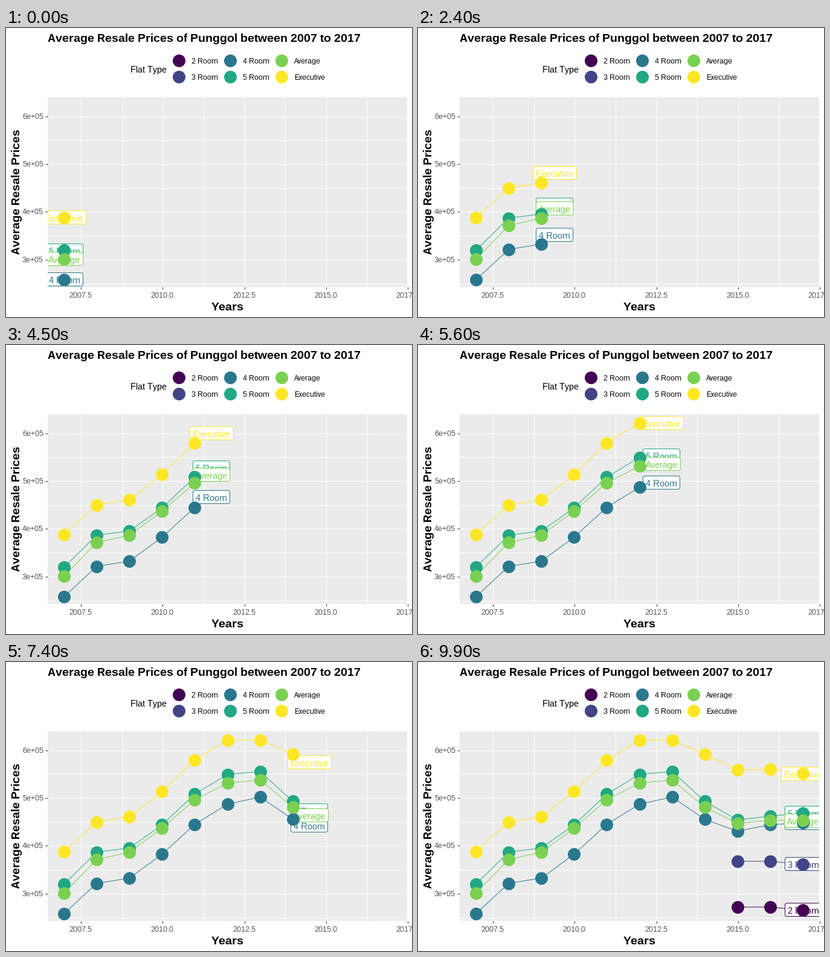
Animation, 672 px wide and 480 px high, one loop 10 s. Source, as a matplotlib script:

```python
import numpy as np
import matplotlib.pyplot as plt
from matplotlib.animation import FuncAnimation
from matplotlib.patches import FancyBboxPatch, Rectangle

# Whole-pixel glyph advances, no kerning
plt.rcParams.update({
    "font.family": "Liberation Sans",
    "text.hinting": "native",
    "text.hinting_factor": 1,
    "text.kerning_factor": 6,
})

W, H, DPI = 672, 480, 96
PX = 72 / DPI
LEFT, RIGHT, TOP, BOTTOM = 69, 664, 115, 430
FRAMES = 100
RADIUS = 10.5
CEILING = 129.5

YEARS = np.arange(11)
# Frames on which each year is reached
KEYS = [round(k * (FRAMES - 1) / 10) for k in YEARS]
# Yearly heights of the average on the stage
AVERAGE = np.array([384, 328, 316, 276, 229, 201, 196, 241, 268, 263, 263])


def wave(base, amp, peak, period):
    return base + amp * np.cos(2 * np.pi * (YEARS - peak) / period)


# name, first year, distance below the average
TYPES = [
    ("2 Room", 8, 139 + 5 * (YEARS - 8)),
    ("3 Room", 8, 63 + 5 * (YEARS - 8)),
    ("4 Room", 0, wave(23.5, 20, 2.6, 16)),
    ("5 Room", 0, wave(-10.2, -4.8, 0, 5.5)),
    ("Average", 0, 0 * YEARS),
    ("Executive", 0, wave(-74, -15, 7.7, 11)),
]
COLORS = plt.get_cmap("viridis")(np.linspace(0, 1, len(TYPES)))


def year_x(k):
    return 96.05 + 54.1 * k


def price_y(v):
    return 145.6 + 79.45 * (6 - v)


def pixel(p):
    return np.round(p) + 0.5


fig = plt.figure(figsize=(W / DPI, H / DPI), dpi=DPI, facecolor="white")
ax = fig.add_axes([0, 0, 1, 1])
ax.set(xlim=(0, W), ylim=(H, 0))
ax.axis("off")

panel = ax.add_patch(Rectangle((LEFT, TOP), RIGHT - LEFT, BOTTOM - TOP,
                               fc="#EBEBEB", lw=0, zorder=0))


def write(x, y, s, size, color="black", **kw):
    return ax.text(x, y, s, fontsize=size * PX, color=color,
                   va="baseline", **kw)


def stroke(x, y, color, z=1):
    return ax.plot(x, y, color=color, lw=PX, zorder=z,
                   solid_capstyle="butt")[0]


def dots(x, y, color, z=4):
    return ax.plot(x, y, "o", color=color, ms=2 * RADIUS * PX, mew=0,
                   zorder=z, snap=False)[0]


def draw_axes():
    for v in np.arange(2.5, 6.1, 0.5):
        y = pixel(price_y(v))
        stroke([LEFT, RIGHT], [y, y], "white")
        if v >= 3 and v == int(v):
            stroke([LEFT - 4, LEFT], [y, y], "#333333")
            write(62, y + 4.5, f"{int(v)}e+05", 12, "#4D4D4D", ha="right")
    for i in range(9):
        k = 0.5 + 1.25 * i
        x = pixel(year_x(k))
        if x < RIGHT:
            stroke([x, x], [TOP, BOTTOM], "white")
        if i % 2 == 0:
            stroke([x, x], [BOTTOM, BOTTOM + 4], "#333333")
            write(x, 448, f"{2007 + k:.1f}", 12, "#4D4D4D", ha="center")


def draw_titles():
    price = "Average Resale Prices"
    write(69, 23, f"{price} of Punggol between 2007 to 2017", 19,
          weight="bold")
    write(367, 469, "Years", 19, ha="center", weight="bold")
    write(23, 272, price, 19, ha="center", weight="bold",
          rotation=90, rotation_mode="anchor")


def draw_legend():
    write(206, 74, "Flat Type", 15)
    for i, (name, *_) in enumerate(TYPES):
        x, y = 286 + 85 * (i // 2), 53.5 + 27 * (i % 2)
        dots([x], [y], COLORS[i])
        write(x + 21, y + 5.5, name, 12)


class Track:
    """One flat type: its line, its moving label and its yearly dots."""

    def __init__(self, order, name, start, gap):
        color, z = COLORS[order], order / 10
        self.start = start
        self.ys = np.maximum(AVERAGE + gap, CEILING)
        self.line = stroke([], [], color, 2 + z)
        self.dots = dots([], [], color, 4 + z)
        self.text = write(0, 0, name, 15, color, ha="center",
                          zorder=3.05 + z)
        self.w = round(self.text.get_window_extent().width) + 9
        self.box = ax.add_patch(FancyBboxPatch(
            (0, 0), self.w, 22, boxstyle="round,pad=0,rounding_size=3",
            fc="white", ec=color, lw=PX, zorder=3 + z))
        self.parts = [self.line, self.dots, self.text, self.box]
        for part in self.parts:
            part.set_clip_path(panel)
            part.set_clip_on(True)

    def update(self, pos):
        for part in self.parts:
            part.set_visible(pos >= self.start)
        past = (YEARS >= self.start) & (YEARS <= pos)
        xs, ys = year_x(YEARS[past]), self.ys[past]
        x, y = year_x(pos), np.interp(pos, YEARS, self.ys)
        top = pixel(y - 11.5)
        self.line.set_data([*xs, x], [*ys, y])
        self.dots.set_data(xs, ys)
        self.box.set_bounds(pixel(x - self.w / 2), top, self.w, 22)
        self.text.set_position((x + 0.5, top + 17.5))


draw_axes()
draw_titles()
draw_legend()
tracks = [Track(i, *t) for i, t in enumerate(TYPES)]


def update(frame):
    pos = np.interp(frame, KEYS, YEARS)
    for track in tracks:
        track.update(pos)
    return []


anim = FuncAnimation(fig, update, frames=FRAMES, interval=100,
                     init_func=lambda: [], repeat=True, repeat_delay=0)
plt.show()
```
